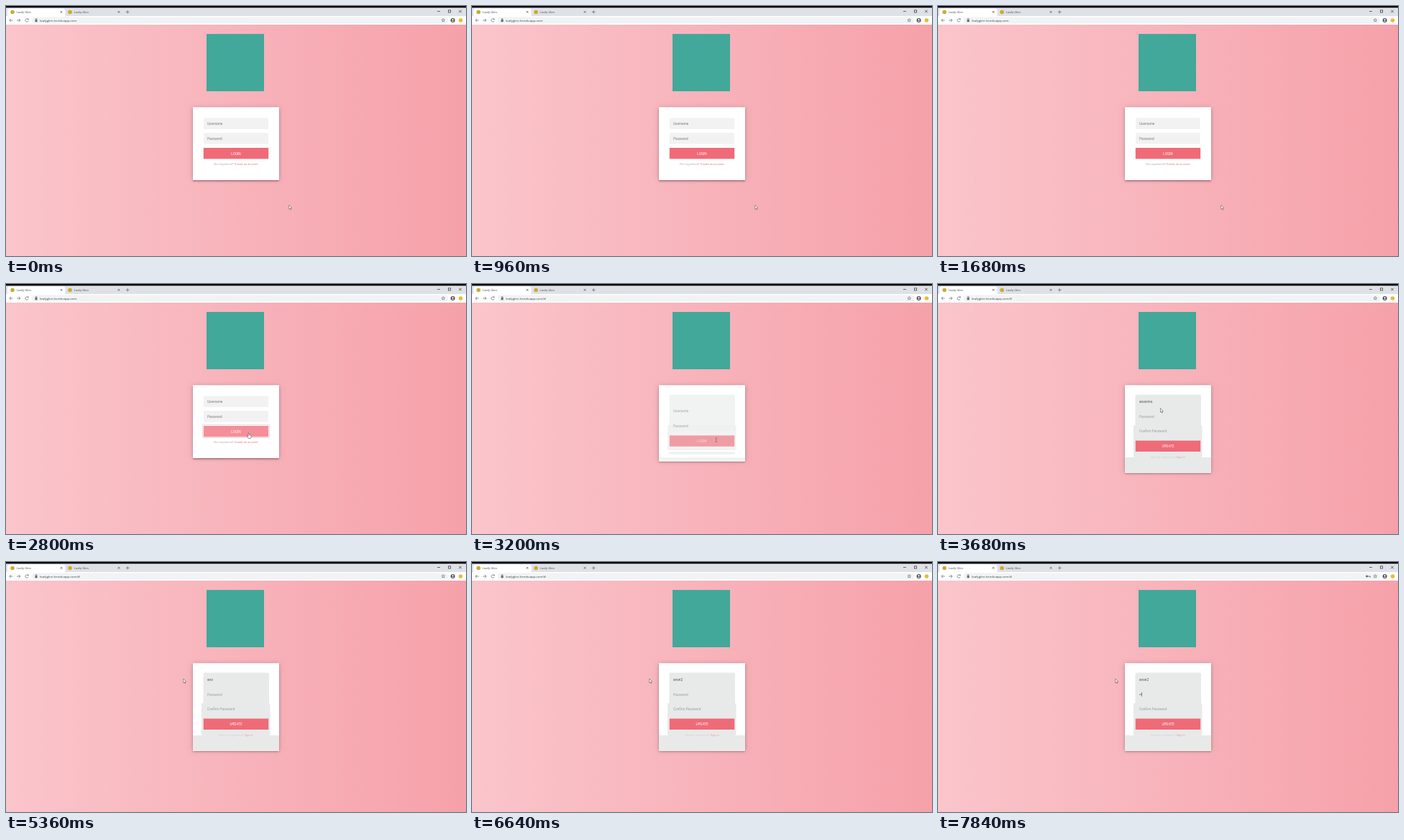
An HTML page with a canvas for the animation above (8 s loop, 640x349 px).

```html
<!DOCTYPE html>
<html lang="en">
<head>
<meta charset="utf-8">
<title>Loafy Glen</title>
<style>
html, body { margin: 0; width: 100%; height: 100%; overflow: hidden; background: #f8b3bb; }
canvas { display: block; width: 100vw; height: 100vh; }
</style>
</head>
<body>
<canvas id="stage" width="640" height="349"></canvas>
<script>
const ctx = document.getElementById('stage').getContext('2d');
const LOOP = 8000, STEP = 80;
const UI = '"Open Sans", "Noto Sans", sans-serif';
const FORM = 'Roboto, "Open Sans", sans-serif';
const PINK = '#ef6b78', GREY = '#e7eae9';
const MORPH = 3010, MORPH_LEN = 600;
const TYPE_AT = 5120, TYPED_AT = 5600, TAB_AT = 6740;

// time, x, y of the pointer
const PATH = [
  [0, 393.8, 278], [2400, 393.8, 278], [2720, 341, 225], [2800, 337, 207.5],
  [2960, 337, 207.5], [3300, 341, 222], [3380, 341, 222], [3640, 309.5, 173.5],
  [3800, 309.5, 173.5], [4240, 300, 164], [4640, 246.8, 163], [8000, 246.8, 163]
];

const clamp = v => Math.max(0, Math.min(1, v));
const lerp = (a, b, k) => a + (b - a) * k;
const swing = k => 0.5 - Math.cos(Math.PI * clamp(k)) / 2;

function box(x, y, w, h, color) {
  ctx.fillStyle = color;
  ctx.fillRect(x, y, w, h);
}

function round(x, y, w, h, r, color) {
  ctx.fillStyle = color;
  ctx.beginPath();
  ctx.roundRect(x, y, w, h, r);
  ctx.fill();
}

function dot(x, y, r, color) {
  ctx.fillStyle = color;
  ctx.beginPath();
  ctx.arc(x, y, r, 0, 7);
  ctx.fill();
}

function label(str, x, y, size, color, family = FORM, align = 'left') {
  ctx.font = size + 'px ' + family;
  ctx.fillStyle = color;
  ctx.textAlign = align;
  ctx.fillText(str, x, y);
  return ctx.measureText(str).width;
}

// points is a flat list: x, y, x, y...
function trace(points, dx = 0, dy = 0) {
  ctx.beginPath();
  for (let i = 0; i < points.length; i += 2) ctx.lineTo(points[i] + dx, points[i + 1] + dy);
}

function line(points, color = '#5f6368', width = 0.7) {
  trace(points);
  ctx.strokeStyle = color;
  ctx.lineWidth = width;
  ctx.stroke();
}

function cross(x, y, r, color) {
  line([x - r, y - r, x + r, y + r], color);
  line([x - r, y + r, x + r, y - r], color);
}

function clipped(x, y, w, h, alpha, draw) {
  ctx.save();
  ctx.beginPath();
  ctx.rect(x, y, w, h);
  ctx.clip();
  ctx.globalAlpha = alpha;
  draw();
  ctx.restore();
}

function drawPage() {
  const g = ctx.createLinearGradient(0, 0, 640, 0);
  g.addColorStop(0, '#fac5cb');
  g.addColorStop(1, '#f6a1aa');
  box(0, 26, 640, 323, g);
  box(279, 39, 80, 80, '#42a899');
}

function drawTab(x) {
  dot(x, 8.5, 2.8, '#c9ab35');
  label('Loafy Glen', x + 5.5, 10, 4.2, '#4a4d51', UI);
  cross(x + 68, 8.3, 1.4, '#4a4d51');
}

function drawBrowser(t) {
  box(0, 0, 640, 26, '#dee1e6');
  box(0, 0, 640, 2.4, '#050505');
  round(2, 3.5, 80.5, 12, [3, 3, 0, 0], '#fff');
  box(0, 14, 640, 12, '#fff');
  drawTab(9);
  drawTab(89);
  line([166.8, 8.3, 171.6, 8.3]);
  line([169.2, 5.9, 169.2, 10.7]);

  line([600, 7.5, 604, 7.5], '#333');
  ctx.strokeRect(615.5, 5.8, 3.2, 3.2);
  cross(632, 7.5, 1.8, '#333');

  line([9.5, 20, 4.8, 20]);
  line([7, 17.8, 4.8, 20, 7, 22.2]);
  line([15, 20, 19.8, 20]);
  line([17.6, 17.8, 19.8, 20, 17.6, 22.2]);
  ctx.beginPath();
  ctx.arc(29, 20, 2.1, 0.4, 5.5);
  ctx.stroke();
  box(30, 17.6, 1.4, 1.6, '#5f6368');

  round(35.5, 15.5, 580, 9, 4.5, '#f1f3f4');
  box(40.5, 19.6, 3, 2.6, '#5f6368');
  ctx.strokeStyle = '#5f6368';
  ctx.strokeRect(41.1, 17.9, 1.8, 2);
  label('loafyglen.herokuapp.com' + (t >= 2960 ? '/#' : ''), 47, 21.7, 4.35, '#3c4043', UI);

  if (t >= 7680) {
    dot(596.6, 20, 1.4, '#5f6368');
    line([597, 20, 601.4, 20, 601.4, 21.4], '#5f6368', 0.9);
  }
  const star = [];
  for (let i = 0; i <= 10; i++) {
    const a = -Math.PI / 2 + i * Math.PI / 5, r = i % 2 ? 1.1 : 2.5;
    star.push(608.3 + r * Math.cos(a), 20 + r * Math.sin(a));
  }
  line(star, '#5f6368', 0.6);
  dot(621.6, 20, 3, '#4a4e54');
  dot(621.6, 19.2, 1.1, '#fff');
  box(620.2, 20.9, 2.8, 0.9, '#fff');
  dot(632.5, 20, 2.8, '#e3bd35');
}

function drawCard(bottom) {
  for (const [blur, dy, alpha] of [[6.7, 0, 0.2], [1.7, 1.7, 0.24]]) {
    ctx.save();
    ctx.shadowColor = `rgba(0,0,0,${alpha})`;
    ctx.shadowBlur = blur;
    ctx.shadowOffsetY = dy;
    box(260, 141.5, 120, bottom - 141.5, '#fff');
    ctx.restore();
  }
}

function drawButton(str, y, color) {
  box(274.8, y, 90.4, 15.4, color);
  label(str, 320, y + 9.5, 4.7, '#fff', FORM, 'center');
}

function drawHint(y, text, link, color) {
  const size = 4.05;
  ctx.font = size + 'px ' + FORM;
  const w = ctx.measureText(text + link).width;
  const x = 320 - w / 2;
  const used = label(text, x, y, size, color);
  label(link, x + used, y, size, '#f0707d');
}

function drawLogin(hover) {
  box(275, 156.5, 90, 15.3, '#f2f2f2');
  box(275, 177.2, 90, 15.3, '#f2f2f2');
  label('Username', 280, 165.8, 4.7, '#7b7b7b');
  label('Password', 280, 186.5, 4.7, '#7b7b7b');
  if (hover) {
    ctx.strokeStyle = '#eddcdd';
    ctx.lineWidth = 1;
    ctx.strokeRect(273.5, 196.5, 93, 18);
  }
  drawButton('LOGIN', 198, hover ? '#f48f99' : PINK);
  drawHint(222.2, 'Not registered? ', 'Create an account', '#b0b0b0');
}

function userName(t) {
  if (t < TYPE_AT) return 'anonimo';
  return 'anon2'.slice(0, 1 + Math.floor((t - TYPE_AT) / 120));
}

function drawCaret(x, y, t, since) {
  if (Math.floor((t - since) / 530) % 2 === 0) box(x + 0.3, y - 4.7, 0.6, 6, '#444');
}

function drawUpdate(t) {
  const user = userName(t);
  ctx.font = '4.7px ' + FORM;
  if (t > 4240 && t < TYPE_AT) {
    const w = ctx.measureText(user).width, k = clamp((t - 4240) / 180);
    box(280 + w * (1 - k), 161, w * k, 6.5, '#9cc4f5');
  }
  const w = label(user, 280, 165.8, 4.7, '#4d5050');
  if (t >= TYPED_AT && t < TAB_AT) drawCaret(280 + w, 165.8, t, TYPED_AT);

  const count = t >= 7760 ? 2 : t >= 7680 ? 1 : 0;
  if (count) for (let i = 0; i < count; i++) dot(280.9 + i * 1.6, 184.9, 0.65, '#555');
  else label('Password', 280, 186.5, 4.7, '#9a9e9e');
  if (t >= TAB_AT) drawCaret(280 + count * 1.6 - 0.3, 186.5, t, count ? 7680 : TAB_AT);

  label('Confirm Password', 280, 207.2, 4.7, '#9a9e9e');
  drawButton('UPDATE', 218.6, PINK);
  ctx.globalAlpha *= 0.6;
  drawHint(242.6, 'Already registered? ', 'Sign in', '#c2c7c7');
}

function drawForms(t) {
  const p = swing((t - MORPH) / MORPH_LEN);
  const bottom = lerp(243, 263.7, p);
  drawCard(bottom);
  if (p === 0) {
    drawLogin(t >= 2740);
    return;
  }
  ctx.globalAlpha = clamp(p * 2.5);
  round(274.5, 154.5, 91.5, 50, 2, GREY);
  round(272, 197, 95.5, p < 1 ? 35 : 45, 2, GREY);
  if (p < 1) box(274, 234, 92, 4, GREY);
  box(260, 242, 120, bottom - 242, GREY);
  ctx.globalAlpha = 1;

  if (p < 1) {
    clipped(272, 155 + 40 * p, 96, 77 - 40 * p, Math.pow(1 - p, 1.8), () => {
      ctx.translate(0, 59 * p);
      drawLogin(false);
    });
  }
  clipped(260, 154, 120, 92 * p ** 3, p ** 5, () => drawUpdate(t));
}

function pointerAt(t) {
  const i = Math.max(1, PATH.findIndex(k => k[0] >= t));
  const [t0, x0, y0] = PATH[i - 1], [t1, x1, y1] = PATH[i];
  const k = (t - t0) / (t1 - t0);
  return [lerp(x0, x1, k), lerp(y0, y1, k)];
}

function drawPointer(t) {
  const [x, y] = pointerAt(t);
  const hand = t >= 2800 && t < 3040;
  const beam = (t >= 3200 && t < 3460) || (t > 4160 && x > 275);
  if (beam) {
    line([x - 1.1, y - 2.7, x + 1.1, y - 2.7], '#555', 0.5);
    line([x, y - 2.7, x, y + 2.7], '#555', 0.5);
    line([x - 1.1, y + 2.7, x + 1.1, y + 2.7], '#555', 0.5);
    return;
  }
  const shape = hand
    ? [0, 0.5, 1, 0.5, 1.2, 3, 4, 3.8, 4, 6, 3.3, 8, 0.3, 8, -1.6, 5, -0.9, 4.4, 0, 5.2]
    : [0, 0, 0, 5.6, 1.3, 4.5, 2.2, 6.5, 3.1, 6.1, 2.2, 4.1, 3.8, 4];
  trace(shape, x, y);
  ctx.closePath();
  ctx.fillStyle = '#fff';
  ctx.fill();
  ctx.strokeStyle = '#4a4a4a';
  ctx.lineWidth = 0.55;
  ctx.stroke();
}

function draw(t) {
  drawPage();
  drawForms(t);
  drawBrowser(t);
  drawPointer(t);
}

let start;
function tick(now) {
  start ??= now;
  const t = (now - start) % LOOP;
  draw(Math.min(7840, Math.floor(t / STEP) * STEP));
  requestAnimationFrame(tick);
}
draw(0);
requestAnimationFrame(tick);
</script>
</body>
</html>
```
